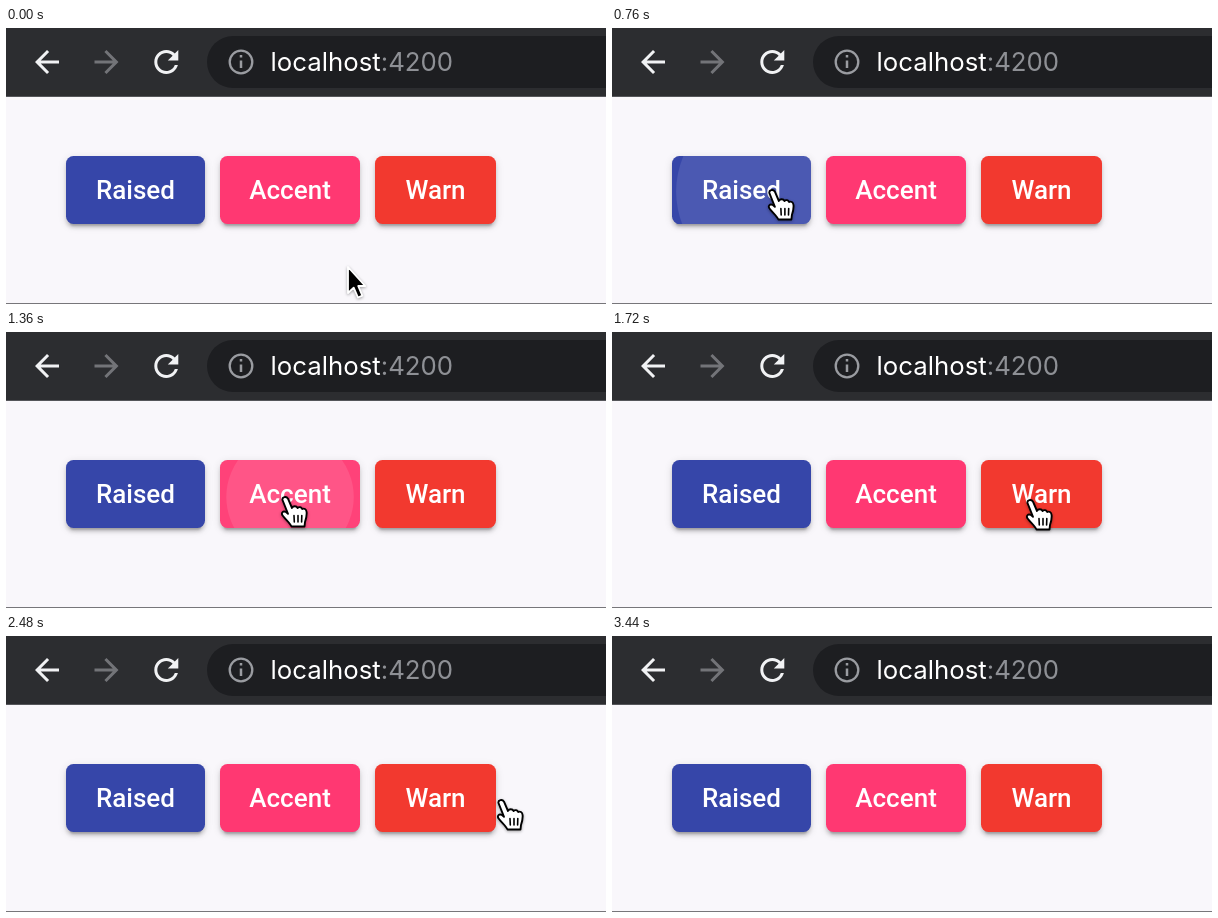
An HTML page for the animation above (3480 ms loop, 600 by 276 pixels).

```html
<!DOCTYPE html>
<html lang="en">
<head>
<meta charset="utf-8">
<title>Raised buttons</title>
<style>
html, body { margin: 0; width: 100%; height: 100%; overflow: hidden; }
#stage { position: relative; width: 600px; height: 276px; overflow: hidden; background: #f9f7fb; }
#stage::after { content: ""; position: absolute; left: 0; right: 0; bottom: 0; height: 1px; background: #77767a; }
svg { position: absolute; left: 0; top: 0; overflow: visible; }
.url { font: 25.8px Inter, Roboto, sans-serif; fill: #fff; }
.port { fill: #8e9095; }
.button {
  position: absolute; top: 128px; height: 68px; border-radius: 7.5px; overflow: hidden;
  box-shadow: 0 5.5px 2px -3.7px rgba(0,0,0,.2), 0 3.7px 3.7px rgba(0,0,0,.14), 0 2px 9px rgba(0,0,0,.12);
}
.button span {
  position: relative; display: block; text-align: center; color: #fff;
  font: 500 26px/68px Roboto, sans-serif;
}
.ripple { position: absolute; border-radius: 50%; background: #fff; opacity: 0; }
#cursor { filter: drop-shadow(0 1.5px 1.5px rgba(0,0,0,.35)); }
</style>
</head>
<body>
<div id="stage">
  <svg width="600" height="69">
    <rect width="600" height="69" fill="#2c2d30"/>
    <rect y="68" width="600" height="1" fill="#55565a"/>
    <rect x="201" y="8" width="440" height="52" rx="26" fill="#1d1e21"/>
    <defs>
      <path id="arrow" d="M20 11H7.83l5.59-5.59L12 4l-8 8 8 8 1.41-1.41L7.83 13H20z"/>
    </defs>
    <use href="#arrow" fill="#f1f2f4" transform="translate(23 16) scale(1.5)"/>
    <use href="#arrow" fill="#737478" transform="translate(118.5 16) scale(-1.5 1.5)"/>
    <path fill="#f1f2f4" transform="translate(142.3 16) scale(1.5)" d="M17.65 6.35C16.2 4.9 14.21 4 12 4c-4.42 0-8 3.58-8 8s3.58 8 8 8c3.73 0 6.84-2.55 7.73-6h-2.08c-.82 2.33-3.04 4-5.65 4-3.31 0-6-2.69-6-6s2.69-6 6-6c1.66 0 3.14.69 4.22 1.78L13 11h7V4z"/>
    <circle cx="235" cy="34" r="11.3" fill="none" stroke="#9a9ca1" stroke-width="2.3"/>
    <path d="M235 27v2.6M235 32.5v7.5" stroke="#9a9ca1" stroke-width="2.5"/>
    <text class="url" x="264.5" y="43">localhost<tspan class="port">:4200</tspan></text>
  </svg>
  <svg id="cursor" width="1" height="1">
    <path id="pointer" fill="#000" stroke="#fff" stroke-width="1.8" stroke-linejoin="round"
      d="M0 0V26L5.7 20.6 10 30.5 14.3 28.6 10.2 19H17.2Z"/>
    <g id="hand" stroke="#000" stroke-width="1.9" stroke-linejoin="round" stroke-linecap="round">
      <path fill="#fff" d="M-4.5 3C-5-.2-.8-1.2 1 1.7L5 11C6 8.6 9.5 8.6 10.5 11 12 9.5 14.5 10 15.2 12 17 11 19.3 12 19.6 15 20 19 19 22 18 25L17.5 29.5H4.5C3 26-1 23-4 19-6.5 16-4 13.3-1 15L1 16.8Z"/>
      <path fill="none" stroke-width="1.6" d="M7 18.5L7.3 25M11 18.5V25M14.8 18.5L14.6 25"/>
    </g>
  </svg>
</div>
<script>
const LOOP = 3480, STEP = 40, ENTER = 225, FADE = 150;
const stage = document.getElementById('stage');
const cursor = document.getElementById('cursor');
const pointer = document.getElementById('pointer');
const hand = document.getElementById('hand');

// Each press: time down, x, y, time the fade begins
const buttons = [
  { label: 'Raised', x: 60, w: 139, color: '#3646a9', presses: [[640, 153, 163, 865]] },
  { label: 'Accent', x: 214, w: 140, color: '#ff3872', presses: [[1060, 275, 163, 1285], [1265, 284, 165, 1490]] },
  { label: 'Warn', x: 369, w: 121, color: '#f2392f', presses: [[1880, 422, 169, 2105]] }
];

// Time, x, y; the cursor leaves the stage after the last key
const path = [
  [0, 342, 239], [80, 338, 237], [440, 152, 162], [720, 153, 162],
  [960, 273, 162], [1160, 274, 162], [1360, 281, 165], [1460, 283, 165],
  [1720, 420, 168], [2200, 424, 168], [2440, 456, 167], [2480, 497, 164]
];

const clamp = v => Math.min(1, Math.max(0, v));
const smooth = v => v * v * (3 - 2 * v);
const easeOut = v => 1 - (1 - v) ** 3;

const ripples = [];
for (const b of buttons) {
  const el = document.createElement('div');
  el.className = 'button';
  Object.assign(el.style, { left: b.x + 'px', width: b.w + 'px', background: b.color });
  for (const [down, x, y, up] of b.presses) {
    const cx = x - b.x, cy = y - 128;
    const radius = Math.hypot(Math.max(cx, b.w - cx), Math.max(cy, 68 - cy));
    const dot = document.createElement('div');
    dot.className = 'ripple';
    Object.assign(dot.style, {
      left: cx - radius + 'px', top: cy - radius + 'px',
      width: 2 * radius + 'px', height: 2 * radius + 'px'
    });
    el.append(dot);
    ripples.push({ dot, down, up });
  }
  const text = document.createElement('span');
  text.textContent = b.label;
  el.append(text);
  stage.insertBefore(el, cursor);
}

function position(t) {
  const i = path.findIndex(k => k[0] >= t);
  if (i < 0) return null;
  if (i === 0) return path[0].slice(1);
  const [t0, x0, y0] = path[i - 1], [t1, x1, y1] = path[i];
  const p = smooth((t - t0) / (t1 - t0));
  return [x0 + (x1 - x0) * p, y0 + (y1 - y0) * p];
}

function draw(t) {
  const at = position(t);
  cursor.style.display = at ? '' : 'none';
  if (at) {
    const [x, y] = at;
    // The hand lingers briefly past the right edge of a button
    const over = y < 196 && buttons.some(b => x >= b.x && x <= b.x + b.w + 8);
    cursor.style.transform = `translate(${x}px, ${y}px)`;
    hand.style.display = over ? '' : 'none';
    pointer.style.display = over ? 'none' : '';
  }
  for (const { dot, down, up } of ripples) {
    const grow = easeOut(clamp((t - down) / ENTER));
    const fade = 1 - clamp((t - up) / FADE);
    dot.style.transform = `scale(${grow})`;
    dot.style.opacity = t < down ? 0 : 0.1 * fade;
  }
}

const start = performance.now();
function tick() {
  const t = (performance.now() - start) % LOOP;
  draw(Math.floor(t / STEP) * STEP);
  requestAnimationFrame(tick);
}
tick();
</script>
</body>
</html>
```
